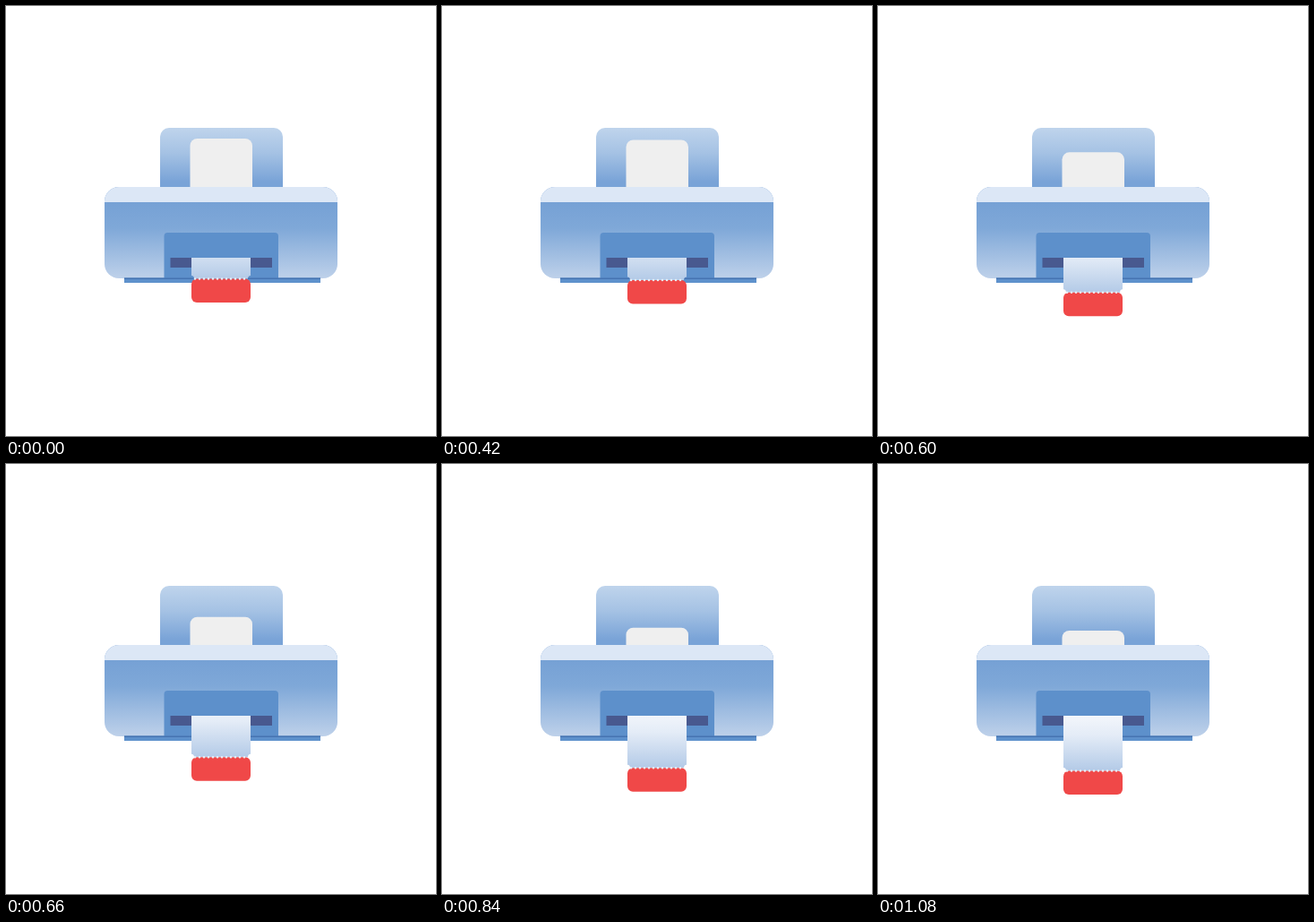
Write an HTML page that moves like this. It is 480x480 px and loops after 1.8 s.

```html
<!DOCTYPE html>
<html lang="en">
<head>
<meta charset="utf-8">
<title>Printer</title>
<style>
  html, body { margin: 0; height: 100%; overflow: hidden; background: #fff; }
  svg { display: block; width: 100%; height: 100%; }
</style>
</head>
<body>
<svg viewBox="0 0 480 480">
  <defs>
    <linearGradient id="back" x2="0" y2="1">
      <stop offset="0" stop-color="#bfd4ec"/>
      <stop offset=".35" stop-color="#a5c2e4"/>
      <stop offset=".75" stop-color="#79a3d7"/>
    </linearGradient>
    <linearGradient id="body" x2="0" y2="1">
      <stop offset=".17" stop-color="#76a1d5"/>
      <stop offset=".45" stop-color="#7fa8d8"/>
      <stop offset="1" stop-color="#bed1ea"/>
    </linearGradient>
    <linearGradient id="ticketFill" x2="0" y2="1">
      <stop offset="0" stop-color="#f3f6fb"/>
      <stop offset=".35" stop-color="#e4ecf7"/>
      <stop offset="1" stop-color="#b3cae7"/>
    </linearGradient>
    <clipPath id="bodyShape"><rect x="110" y="202" width="260" height="102" rx="16"/></clipPath>
    <clipPath id="outlet"><rect x="200" y="281" width="80" height="110"/></clipPath>
  </defs>

  <rect x="172" y="136" width="137" height="80" rx="10" fill="url(#back)"/>
  <rect id="sheet" x="205.5" y="148" width="69.5" height="70" rx="8" fill="#efefef"/>

  <g clip-path="url(#bodyShape)">
    <rect x="110" y="202" width="260" height="102" fill="url(#body)"/>
    <rect x="110" y="202" width="260" height="17" fill="#dce7f6"/>
  </g>
  <path d="M176.5 304V257q0-4 4-4H300q4 0 4 4V304z" fill="#5d90cb"/>
  <rect x="132" y="303.5" width="219" height="5.5" fill="#5e91cc"/>
  <rect x="132" y="303.5" width="219" height="1.5" fill="#4674b2"/>
  <rect x="183.5" y="281" width="113.5" height="11" fill="#48598f"/>

  <g clip-path="url(#outlet)">
    <g id="ticket">
      <path d="M207 243H273V301q-3 0-3 3.5H210q0-3.5-3-3.5z" fill="url(#ticketFill)"/>
      <rect x="207" y="304.5" width="66" height="26.5" rx="6" fill="#f04848"/>
      <path d="M211 304.5H270" stroke="#e9eef6" stroke-width="2.6" stroke-linecap="round" stroke-dasharray="0 5"/>
    </g>
  </g>
</svg>
<script>
  const LOOP = 1800, STEP = 30, START = 300, LENGTH = 780, TRAVEL = 38;
  const sheet = document.getElementById('sheet');
  const ticket = document.getElementById('ticket');

  // Cubic bezier (.51, 0, .28, 1), solved for x by bisection.
  function ease(x) {
    let lo = 0, hi = 1, s;
    for (let i = 0; i < 20; i++) {
      s = (lo + hi) / 2;
      const r = 1 - s;
      if (3 * r * r * s * .51 + 3 * r * s * s * .28 + s ** 3 < x) lo = s;
      else hi = s;
    }
    return s * s * (3 - 2 * s);
  }

  function draw() {
    const time = Math.floor(performance.now() % LOOP / STEP) * STEP;
    const progress = Math.min(1, Math.max(0, (time - START) / LENGTH));
    const shift = `translate(0 ${(TRAVEL * ease(progress)).toFixed(2)})`;
    sheet.setAttribute('transform', shift);
    ticket.setAttribute('transform', shift);
    requestAnimationFrame(draw);
  }
  draw();
</script>
</body>
</html>
```
